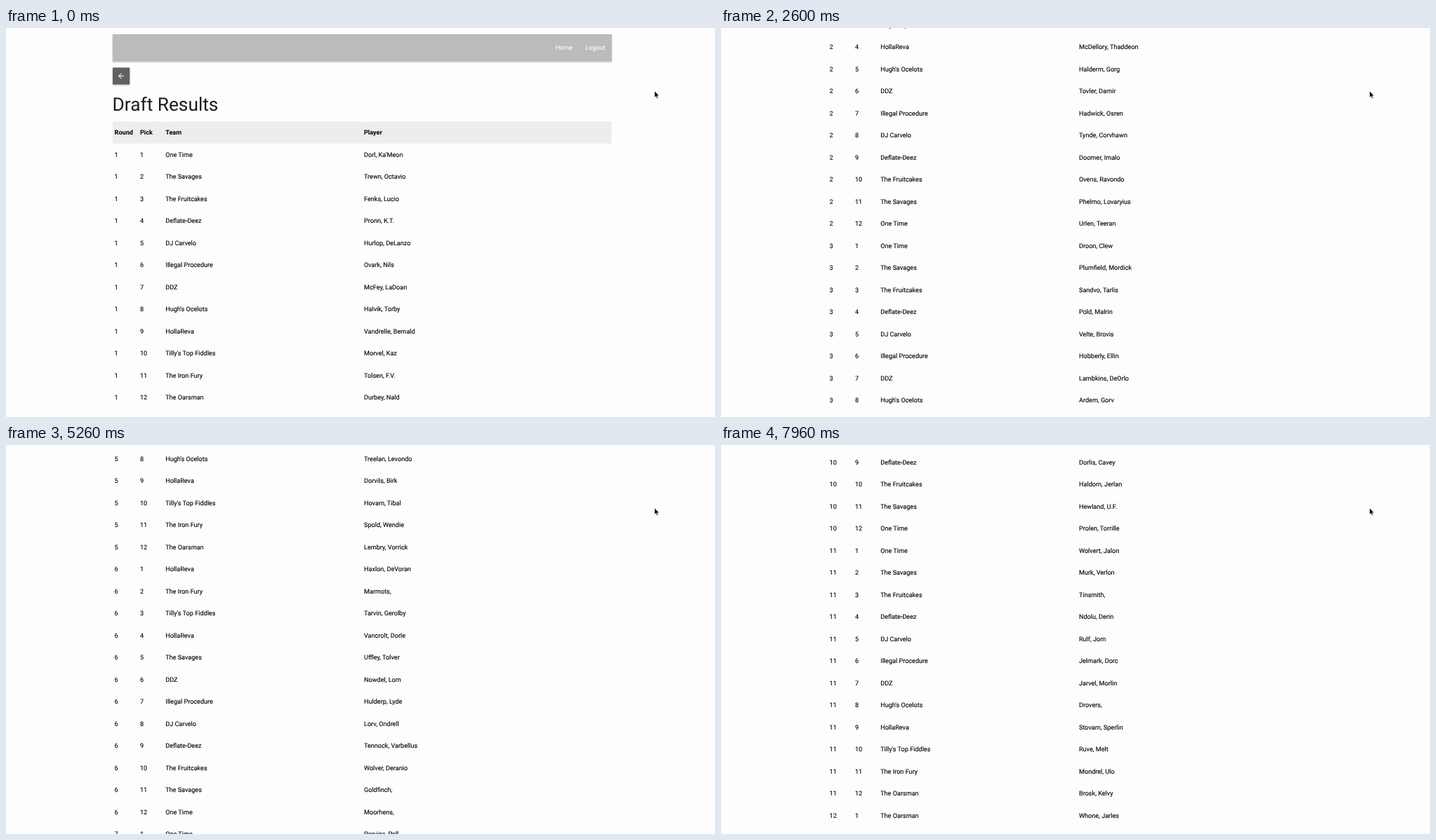
Animation, 1010 px wide and 555 px high, one loop 8000 ms. Source, as an HTML page:

```html
<!DOCTYPE html>
<html lang="en">
<head>
<meta charset="utf-8">
<title>Draft Results</title>
<style>
  html, body { margin: 0; width: 100%; height: 100%; overflow: hidden; background: #fdfdfd; }
  svg { display: block; width: 1010px; height: 555px; }
  text { font: 9.1px Roboto, Arial, sans-serif; fill: #000; text-rendering: geometricPrecision; }
  #rows text { stroke: #000; stroke-width: .12px; }
  .nav text { fill: #fff; stroke: #fff; stroke-width: .1px; }
  .head text { font-weight: 700; }
  .title { font-size: 26.28px; fill: #1c1c1c; }
  .raised { filter: drop-shadow(0 1px 1px rgba(0, 0, 0, .3)); }
</style>
</head>
<body>
<svg viewBox="0 0 1010 555">
  <g id="page">
    <g class="nav">
      <rect class="raised" x="152" y="9" width="710.8" height="38.4" fill="#bbb"/>
      <text x="782.7" y="31.2">Home</text>
      <text x="825.2" y="31.2">Logout</text>
    </g>
    <rect class="raised" x="152" y="56.6" width="24.2" height="24" rx="1" fill="#616161"/>
    <path transform="translate(158 62.4) scale(.5)" fill="#fff"
      d="M20 11H7.83l5.59-5.59L12 4l-8 8 8 8 1.41-1.41L7.83 13H20z"/>
    <text class="title" x="151.6" y="117.5">Draft Results</text>
    <rect x="152" y="133.4" width="710.8" height="31.3" fill="#ededed"/>
    <g id="head" class="head"></g>
    <g id="rows"></g>
  </g>
  <path d="M924 90v9.2l2.1-1.9 1.3 3.1 1.5-.6-1.3-3.1h2.7z"
    fill="#000" stroke="#fff" stroke-width=".5"/>
</svg>
<script>
const LOOP = 8000, ROW = 31.5, FIRST_ROW = 183.7;
const COLUMNS = [154.6, 190.9, 227.2, 510];

const teams = ["One Time", "The Savages", "The Fruitcakes", "Deflate-Deez", "DJ Carvelo",
  "Illegal Procedure", "DDZ", "Hugh's Ocelots", "HollaReva", "Tilly's Top Fiddles",
  "The Iron Fury", "The Oarsman"];
// Picks that changed hands, keyed by round-pick.
const trades = { "6-1": "HollaReva", "6-5": "The Savages" };

const rounds = [
  "Dorl, Ka'Meon|Trewn, Octavio|Fenks, Lucio|Pronn, K.T.|Hurlop, DeLanzo|Ovark, Nils|McFey, LaDoan|Halvik, Torby|Vandrelle, Bernald|Morvel, Kaz|Tolsen, F.V.|Durbey, Nald",
  "Vomes, Dranlin|Ulvart, Izoriel|Trelkovitz, Jeb|McDellory, Thaddeon|Halderm, Gorg|Tovler, Damir|Hadwick, Osren|Tynde, Corvhawn|Doomer, Imalo|Ovens, Ravondo|Phelmo, Lovaryius|Urlen, Teeran",
  "Droon, Clew|Plumfield, Mordick|Sandvo, Tarlis|Pold, Malrin|Velte, Brovis|Hobberly, Ellin|Lambkins, DeOrlo|Ardem, Gorv|Nolby, Jud|Dabe, Selden|Drevell, Osmiah|Marshfold, Tenny",
  "Fenderom, Tolvin|Plowner, Harlison|Odelvar, Silvan|Vorl, Byreck|Melfon, Hassell|Roop, Dorvan|Pelzharold, Garvy|Drovel, Corlavis|Drevo, Wim|Vore, Stanner|Tinslow, Kameer|Hosk, Ferdan",
  "Palver, Dorrin|Kestle, Ormond|Yarlow, Denvik|Bramdel, Toren|Sorvane, Lutho|Quimbly, Rasten|Felgrove, Marn|Treelan, Levondo|Dorvils, Birk|Hovarn, Tibal|Spold, Wendie|Lembry, Vorrick",
  "Haxlon, DeVoran|Marmots,|Tarvin, Gerolby|Vancrolt, Dorle|Uffley, Tolver|Nowdel, Lom|Hulderp, Lyde|Lorv, Ondrell|Tennock, Varbellus|Wolver, Deranio|Goldfinch,|Moorhens,",
  "Porvins, Pell|Ostrel, Gavin|Mardle, Towen|Fendrick, Olo|Calvorn, Dreese|Brisco, Haldon|Torvane, Ellis|Wexlow, Marden|Jarnell, Corvo|Lundale, Perrin|Skelby, Dorian|Ashvern, Tobin",
  "Kolvane, Merrit|Dunvale, Orrin|Farlow, Jestin|Grindel, Parro|Holvey, Lorcan|Medlow, Tarrik|Vinsel, Roddan|Pallermon, Odrin|Obdellan, Imeel|Rolds, Thorben|Cuff, Rendoll|Ovami, Jep",
  "Varlon, Pellon|Gume, Frent|Trelbott, Dov|Wolbern, Tovrell|Raumeltsdorfer, Bo|Mandgovel, Tu|Korvey, Rud|Ruvens, Phelo|Gravorn, Jorry|Dorme, Jeck|Hontry, Halber|Brundt, LaForrette",
  "Curk, Jorad|Selvane, Tomas|Wardock, Ilven|Nestrom, Vale|Bexley, Dorlan|Ormand, Kessel|Thrandle, Ivo|Pelvor, Garrin|Dorlis, Cavey|Haldorn, Jerlan|Hewland, U.F.|Prolen, Torrille",
  "Wolvert, Jalon|Murk, Verlon|Tinsmith,|Ndolu, Derin|Rulf, Jorn|Jelmark, Dorc|Jarvel, Morlin|Drovers,|Stovarn, Sperlin|Ruve, Melt|Mondrel, Ulo|Brosk, Kelvy",
  "Whone, Jarles"
].map(list => list.split("|"));

// Scroll position at a few moments.
const knots = [[230, 0], [1310, 282], [2600, 626], [3770, 1079.5], [5260, 1893.5], [7060, 3038.5], [7960, 3810]];

// Evenly spaced repaint times between two moments.
const spaced = (from, to, count) =>
  Array.from({ length: count }, (_, i) => from + (to - from) * i / count);
const repaints = [
  ...spaced(590, 1310, 2), 1310, ...spaced(1640, 2600, 3), 2600,
  ...spaced(2870, 3770, 3), 3770, ...spaced(4070, 4640, 2), 4640,
  4970, 5260, ...spaced(5560, 6730, 4), 6730, ...spaced(7060, 7960, 3), 7960
];

const page = document.getElementById("page");

function addText(parent, x, y, content) {
  const node = document.createElementNS("http://www.w3.org/2000/svg", "text");
  node.setAttribute("x", x);
  node.setAttribute("y", y);
  node.textContent = content;
  parent.append(node);
}

function addRow(id, y, cells) {
  const parent = document.getElementById(id);
  cells.forEach((cell, i) => addText(parent, COLUMNS[i], y, cell));
}

function teamFor(round, pick) {
  const seat = round % 2 ? pick - 1 : teams.length - pick;
  return trades[`${round}-${pick}`] || teams[seat];
}

function slope(i) {
  const a = knots[Math.max(i - 1, 0)], b = knots[Math.min(i + 1, knots.length - 1)];
  return (b[1] - a[1]) / (b[0] - a[0]);
}

function scrollAt(time) {
  const i = knots.findIndex((knot, k) => k < knots.length - 1 && time <= knots[k + 1][0]);
  const [t0, y0] = knots[i], [t1, y1] = knots[i + 1];
  const span = t1 - t0, u = (time - t0) / span, v = 1 - u;
  return v * v * (1 + 2 * u) * y0 + u * u * (1 + 2 * v) * y1
    + u * v * span * (v * slope(i) - u * slope(i + 1));
}

function render(time) {
  const shown = repaints.filter(t => t <= time).pop();
  const offset = shown === undefined ? 0 : Math.round(scrollAt(shown) * 2) / 2;
  page.setAttribute("transform", `translate(0 ${-offset})`);
}

addRow("head", 152.2, ["Round", "Pick", "Team", "Player"]);
rounds.forEach((players, r) => players.forEach((player, p) =>
  addRow("rows", FIRST_ROW + ROW * (r * teams.length + p), [r + 1, p + 1, teamFor(r + 1, p + 1), player])));

const start = performance.now();
function tick() {
  render((performance.now() - start) % LOOP);
  requestAnimationFrame(tick);
}
tick();
</script>
</body>
</html>
```
